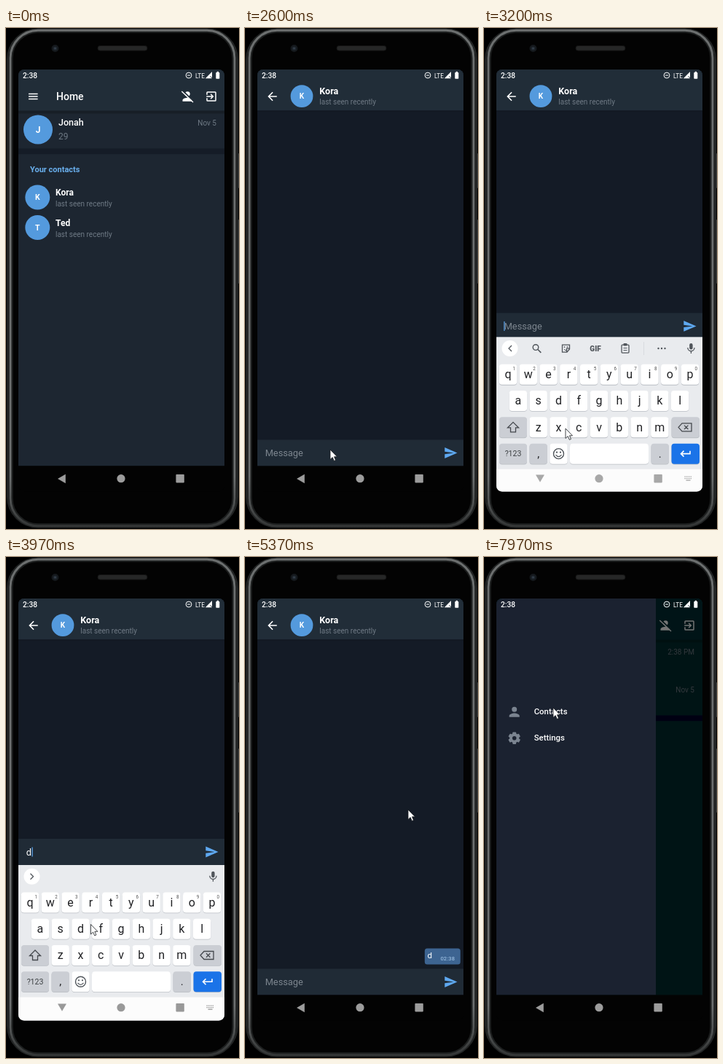
Animation of 320 by 688 pixels, one loop 8000 ms. Source, as an HTML page:

```html
<!DOCTYPE html>
<html lang="en">
<head>
<meta charset="utf-8">
<title>Chat app demo</title>
<style>
html, body { margin: 0; width: 100%; height: 100%; overflow: hidden; background: #000; }
svg { display: block; width: 100%; height: 100%; font-family: Roboto, "Noto Sans", sans-serif; }
</style>
</head>
<body>
<svg id="stage" viewBox="0 0 320 688"></svg>
<script>
const LOOP = 8000;
const BAR = '#212d38', LIST = '#1d2631', GAP = '#151c27', CHAT = '#141b26', BODY = '#030303';
const BLUE = '#549add', MUTED = '#6f7a85';
const FRIENDS = ['Jonah', 'Kora', 'Ted'];

// Markup helpers
const rect = (x, y, w, h, fill, r = 0, extra = '') =>
  `<rect x="${x}" y="${y}" width="${w}" height="${h}" rx="${r}" fill="${fill}" ${extra}/>`;
const dot = (x, y, r, fill, extra = '') => `<circle cx="${x}" cy="${y}" r="${r}" fill="${fill}" ${extra}/>`;
const text = (s, x, y, size, fill, weight = 400, anchor = 'start') =>
  `<text x="${x}" y="${y}" font-size="${size}" font-weight="${weight}" fill="${fill}" text-anchor="${anchor}">${s}</text>`;
const line = (d, color, w = 1.3, extra = '') => `<path d="${d}" fill="none" stroke="${color}" stroke-width="${w}" ${extra}/>`;
const icon = (d, x, y, k, fill) =>
  `<path transform="translate(${x} ${y}) scale(${k}) translate(-12 -12)" d="${d}" fill="${fill}"/>`;
const group = (id, body, extra = '') => `<g id="${id}" ${extra}>${body}</g>`;

const ICON = {
  menu: 'M3 18h18v-2H3v2zm0-5h18v-2H3v2zm0-7v2h18V6H3z',
  back: 'M20 11H7.83l5.59-5.59L12 4l-8 8 8 8 1.41-1.41L7.83 13H20v-2z',
  send: 'M2 21L23 12 2 3V10l15 2-15 2z',
  person: 'M12 12a4 4 0 1 0 0-8a4 4 0 0 0 0 8zm0 2c-2.67 0-8 1.34-8 4v2h16v-2c0-2.66-5.33-4-8-4z',
  exit: 'M10.1 15.6L11.5 17l5-5-5-5-1.4 1.4L12.7 11H3v2h9.7zM19 3H5a2 2 0 0 0-2 2v4h2V5h14v14H5v-4H3v4a2 2 0 0 0 2 2h14a2 2 0 0 0 2-2V5a2 2 0 0 0-2-2z'
};

function avatar(name, x, y, r, size) {
  return dot(x, y, r, BLUE) + text(name[0], x, y + size * .36, size, '#fff', 700, 'middle');
}

function chatRow(name, last, when, y) {
  return avatar(name, 44, y, 20, 12) + text(name, 72, y - 5.5, 12.5, '#fff', 500) +
    text(last, 72, y + 13.3, 12, MUTED) + text(when, 289, y - 5.5, 10, MUTED, 400, 'end');
}

function contactRow(name, y) {
  return avatar(name, 43.3, y, 17, 10.5) + text(name, 68, y - 2.5, 12, '#fff', 700) +
    text('last seen recently', 68, y + 12.5, 10, MUTED);
}

function phone() {
  const rim = (inset, y, color, w) =>
    rect(inset, y, 320 - 2 * inset, 687 - 2 * y, 'none', 44 - inset, `stroke="${color}" stroke-width="${w}"`);
  return rect(0, 0, 320, 688, '#000') +
    rect(318, 172, 2, 48, '#3a3d3d', 1) + rect(318, 263, 2, 88, '#3a3d3d', 1) +
    rect(1, 1.5, 318, 685, BODY, 43) +
    rim(2.5, 2, '#222424', 3) + rim(8.5, 5.5, '#1d1f1f', 2.4) + rim(6, 3.2, 'url(#metal)', 3) +
    dot(67.5, 28, 5, '#15191d') + dot(67.5, 28, 2.6, '#222a32') + dot(67.5, 28, 1.1, '#3a4652') +
    rect(126, 24.5, 68, 6.5, '#262727', 3.2, 'stroke="#161616"');
}

function home() {
  return rect(17, 57, 283, 545, LIST, 0, 'id="list"') +
    rect(17, 57, 283, 56.5, BAR, 0, 'id="bar"') +
    rect(17, 113.5, 283, 4, '#000', 0, 'opacity=".22"') +
    rect(17, 165.5, 283, 7.7, GAP, 0, 'id="gap"') +
    icon(ICON.menu, 37.3, 94, .7, '#fff') + text('Home', 69, 99, 14, '#fff', 500) +
    icon(ICON.person, 249.3, 94, .85, '#fff') +
    line('M242.5 86L258.5 101.5', BAR, 1.8, 'id="notch"') + line('M241.3 87L257 102', '#fff', 1.4) +
    icon(ICON.exit, 282, 94, .75, '#fff') +
    group('newChat', chatRow(FRIENDS[1], 'd', '2:38 PM', 139.5)) +
    group('lower', chatRow(FRIENDS[0], '29', 'Nov 5', 139.5) +
      text('Your contacts', 33, 198.3, 11, '#6ab0ee', 700)) +
    group('oldContacts', contactRow(FRIENDS[1], 232.5) + contactRow(FRIENDS[2], 274)) +
    group('newContacts', contactRow(FRIENDS[2], 284.3));
}

function chat() {
  return rect(17, 57, 283, 580, CHAT) + rect(17, 57, 283, 56.5, BAR) +
    rect(17, 113.5, 283, 1, '#10161f') +
    icon(ICON.back, 37.5, 94, .78, '#fff') + avatar(FRIENDS[1], 78, 93.7, 15.4, 10) +
    text(FRIENDS[1], 102.3, 91, 12.5, '#fff', 700) + text('last seen recently', 102.3, 105, 10, MUTED) +
    group('composer',
      group('bubble', rect(246.8, -28, 49, 22, '#3d6491', 3.5) + text('d', 250.5, -15, 11.5, '#fff') +
        text('02:38', 288, -12, 7.7, '#94b8dc', 500, 'end')) +
      rect(17, 0, 283, 36, '#202b36') +
      group('hint', text('Message', 27.7, 22.6, 12.8, '#7d868f')) +
      group('draft', text('d', 27.7, 22.6, 12.8, '#fff')) +
      rect(27.3, 11.5, 1.2, 13, '#5ea8f0', 0, 'id="caret"') +
      icon(ICON.send, 282.5, 18, .82, '#5ea8f0'));
}

const INK = '#202124', GREY = '#cbced4';
const key = (x, y, w, fill) => rect(x, y - 13.2, w, 28, '#b9bdc3', 4) + rect(x, y - 14, w, 28, fill, 4);

function letters(row, x0, y, numbers) {
  return [...row].map((c, i) => {
    const x = x0 + i * 27.78;
    return key(x - 12.2, y, 24.4, '#fff') + text(c, x, y + 5.2, 16, INK, 400, 'middle') +
      (numbers ? text((i + 1) % 10, x + 8.3, y - 6, 6.3, '#555', 400, 'middle') : '');
  }).join('');
}

function toolbar() {
  const y = 438.7, c = '#50555b';
  const mic = rect(282.2, y - 7, 4.4, 8.5, c, 2.2) + line(`M279.8 ${y - 1}a4.6 4.6 0 0 0 9.2 0M284.4 ${y + 4}v3`, c);
  const tools = line(`M38 ${y - 4}l-4 4l4 4`, c) +
    dot(71, y - 1.5, 3.8, 'none', `stroke="${c}" stroke-width="1.4"`) + line(`M74 ${y + 1.5}l4.3 4.3`, c, 1.6) +
    line(`M117.5 ${y}v-5h-10v10h6.5l3.5-4v-1h-4v5`, c) +
    line(`M110 ${y + 1}q2 3 4 1`, c, 1) + dot(110.5, y - 2, .9, c) + dot(114.5, y - 2, .9, c) +
    text('GIF', 153, y + 3.6, 10, c, 900, 'middle') +
    rect(189, y - 5, 10, 11, 'none', 1, `stroke="${c}" stroke-width="1.3"`) + rect(191.5, y - 7, 5, 3.5, c, 1) +
    line(`M191.5 ${y - .5}h5M191.5 ${y + 2.5}h5`, c, 1) +
    [239.5, 244, 248.5].map(x => dot(x, y, 1.2, c)).join('') + rect(219, y - 9, .8, 18, '#d4d7db');
  return dot(35.5, y, 11, '#fff') + mic + group('tools', tools) +
    group('fold', line(`M33.5 ${y - 4}l4 4l-4 4`, c));
}

function keyboard() {
  const [y1, y2, y3, y4] = [474.5, 510.7, 547, 583.3];
  return rect(17, 423, 283, 230, '#e9ebee') + rect(17, 604.5, 283, 60, '#fcfcfc') + toolbar() +
    letters('qwertyuiop', 33, y1, true) + letters('asdfghjkl', 46.9, y2) + letters('zxcvbnm', 74.7, y3) +
    key(21, y3, 38, GREY) + line(`M40 ${y3 - 7}l7.5 7.5h-4v6h-7v-6h-4z`, '#44484d') +
    key(257.5, y3, 38.5, GREY) +
    line(`M267 ${y3}l5-5.5h13v11h-13zM275 ${y3 - 2.7}l5.4 5.4M280.4 ${y3 - 2.7}l-5.4 5.4`, '#44484d') +
    key(21, y4, 38, GREY) + text('?123', 40, y4 + 3.7, 10.5, '#3c4043', 400, 'middle') +
    key(62.5, y4, 24.4, GREY) + text(',', 74.7, y4 + 5, 15, INK, 400, 'middle') +
    key(90.3, y4, 24.4, '#fff') + dot(102.5, y4, 7, 'none', 'stroke="#50555b" stroke-width="1.4"') +
    dot(100, y4 - 2, 1.1, '#50555b') + dot(105, y4 - 2, 1.1, '#50555b') + line(`M98.5 ${y4 + 1.5}q4 5 8 0`, '#50555b') +
    key(118, y4, 108, '#fff') + key(229.5, y4, 24.4, GREY) + text('.', 241.7, y4 + 5, 15, INK, 400, 'middle') +
    key(257.5, y4, 38.5, '#1a73e8') + line(`M283 ${y4 - 4}v4h-12.5M274.5 ${y4 - 4}l-4 4l4 4`, '#fff', 1.6) +
    group('popup', rect(87, 455, 31, 36, '#c5c8cd', 5) + rect(87, 454, 31, 36, '#fff', 5) +
      text('d', 102.5, 479, 20, INK, 400, 'middle'));
}

function navIcons(back, fill) {
  return `<path d="${back}" fill="${fill}"/>` + dot(158, 618.7, 5.6, fill) + rect(233.4, 613, 11.4, 11.4, fill, .8);
}

function drawer() {
  const c = '#7b8490', teeth = [0, 1, 2, 3, 4, 5]
    .map(i => rect(-2.4, -8.3, 4.8, 5, c, .8, `transform="rotate(${i * 60})"`)).join('');
  return rect(17, 57, 219, 545, '#1b2230') + icon(ICON.person, 41.7, 212.7, .88, c) +
    `<g transform="translate(41.7 248.7)">${teeth}${dot(0, 0, 4.7, 'none', `stroke="${c}" stroke-width="3.8"`)}</g>` +
    text('Contacts', 68.7, 216.3, 11.4, '#fff', 500) + text('Settings', 68.7, 252.3, 11.4, '#fff', 500);
}

function status() {
  return text('2:38', 23, 69, 10.2, '#fff', 500) +
    dot(251, 65, 3.9, 'none', 'stroke="#fff" stroke-width="1"') + line('M249 65h4', '#fff', 1.2) +
    text('LTE', 260, 68.5, 8.3, '#fff') +
    '<path d="M283 60v9.2h-9.2z" fill="#fff"/>' + line('M280.5 66l2.5 3', '#38434d', 1) +
    rect(288.3, 61, 5, 8.7, '#fff', .8) + rect(289.6, 59.8, 2.4, 2, '#fff');
}

function minis() {
  return [0, 1, 2, 3, 4].map(i => rect(275.3 + i * 2.1, 615.5, 1.3, 1.3, '#999') +
    rect(275.3 + i * 2.1, 618, 1.3, 1.3, '#999')).join('') + rect(277.5, 620.5, 6, 1.3, '#999');
}

document.getElementById('stage').innerHTML =
  `<defs><linearGradient id="metal" x1="0" y1="0" x2="0" y2="1">
     <stop offset="0" stop-color="#6c6f6f"/><stop offset=".9" stop-color="#6c6f6f"/><stop offset="1" stop-color="#343636"/>
   </linearGradient>
   <clipPath id="screen">${rect(17, 57, 283, 579.5, '#fff', 8)}</clipPath>
   <clipPath id="pages">${rect(17, 56.5, 283, 545, '#fff')}</clipPath>
   <clipPath id="row">${rect(17, 211.5, 283, 42, '#fff')}</clipPath></defs>` + phone() +
  group('view', group('layers', group('home', home()) +
      group('rowTap', dot(0, 0, 1, '#fff', 'id="rowInk"'), 'clip-path="url(#row)"') +
      group('chat', chat()) + dot(0, 0, 1, '#fff', 'id="ink"') +
      rect(17, 57, 283, 545, '#000', 0, 'id="scrim"') + group('drawer', drawer()) + status(),
      'clip-path="url(#pages)"') +
    rect(17, 601.5, 283, 36, BODY) + navIcons('M71 619l10.8-6.2v12.4z', '#9c9c9c') +
    group('keyboard', keyboard()) +
    group('kbNav', navIcons('M71 613.5h12l-6 10.3z', '#999') + minis()),
    'clip-path="url(#screen)"') +
  '<path id="cursor" d="M0 0V13.5L3.2 10.6L5.3 15.4L7.5 14.5L5.5 9.8H9.5Z" fill="#fff" stroke="#15181c" stroke-width=".8"/>';

const el = {};
document.querySelectorAll('#stage [id]').forEach(n => el[n.id] = n);

// Motion helpers
const clamp = v => Math.max(0, Math.min(1, v));
const span = (t, a, b) => clamp((t - a) / (b - a));
const smooth = p => p * p * (3 - 2 * p);
const easeOut = p => 1 - (1 - p) ** 3;
const easeInOut = p => p < .5 ? 2 * p * p : 1 - 2 * (1 - p) ** 2;
const lerp = (a, b, p) => a + (b - a) * p;
const show = (id, on) => el[id].setAttribute('display', on ? 'inline' : 'none');
const fade = (id, v) => el[id].setAttribute('opacity', v);
const move = (id, x, y) => el[id].setAttribute('transform', `translate(${x} ${y})`);

function mix(a, b, p) {
  const part = (s, i) => parseInt(s.slice(i, i + 2), 16);
  return `rgb(${[1, 3, 5].map(i => Math.round(lerp(part(a, i), part(b, i), p)))})`;
}

// Pointer stops: time, x, y
const POINTER = [
  [30, 274, 88], [400, 28, 180], [830, 196, 230], [2070, 196, 230], [2600, 117, 579],
  [2870, 117, 579], [3200, 112, 550], [3600, 103, 512], [3900, 103, 512], [4330, 287, 409],
  [4960, 287, 409], [5370, 224, 347], [5400, 224, 347], [5970, 38, 95], [6500, 38, 95],
  [6700, 41, 99], [7450, 41, 99], [7800, 262, 179], [7970, 95, 207]
];

function pointer(t) {
  const i = POINTER.findIndex(p => p[0] > t);
  if (i < 0) return POINTER[POINTER.length - 1].slice(1);
  if (i === 0) return POINTER[0].slice(1);
  const [t0, x0, y0] = POINTER[i - 1], [t1, x1, y1] = POINTER[i];
  const p = smooth(span(t, t0, t1));
  return [lerp(x0, x1, p), lerp(y0, y1, p)];
}

function ripple(id, t, start, length, x, y, size) {
  const p = span(t, start, start + length), n = el[id];
  n.setAttribute('cx', x);
  n.setAttribute('cy', y);
  n.setAttribute('r', size * easeOut(clamp(p * 1.6)));
  fade(id, p > 0 && p < 1 ? .1 * Math.min(1, p * 8, (1 - p) * 2.5) : 0);
}

function draw(t) {
  const replied = t >= 4600;

  // Home list
  const shift = replied ? 52 : 0;
  show('newChat', replied);
  show('newContacts', replied);
  show('oldContacts', !replied);
  move('lower', 0, shift);
  el.gap.setAttribute('y', 165.5 + shift);
  ripple('rowInk', t, 900, 700, 196, 230, 200);

  // Page transitions rise and fade in, then drop and fade out
  const enter = easeOut(span(t, 1350, 1880)), leave = easeInOut(span(t, 6280, 6690));
  const page = enter * (1 - leave);
  show('chat', page > 0);
  fade('chat', page);
  move('chat', 0, 136 * (1 - page));

  // Keyboard and composer
  const up = easeOut(span(t, 2940, 3260)), down = easeInOut(span(t, 4770, 5004));
  const kb = t < 4000 ? 1 - up : down;
  show('keyboard', kb < 1);
  move('keyboard', 0, 214 * kb);
  fade('kbNav', clamp(1 - 25 * kb));
  const rise = easeOut(span(t, 2960, 3300));
  const fall = easeInOut(span(t, 4800, 5040));
  move('composer', 0, 387 + 178.5 * (t < 4000 ? 1 - rise : fall));

  // Typing
  const typed = t >= 3790 && !replied, focused = t >= 2930 && t < 4770;
  show('hint', !typed);
  show('draft', typed);
  show('bubble', replied);
  show('caret', focused && (t - 2930) % 1000 < 500);
  el.caret.setAttribute('x', typed ? 35.5 : 27.3);
  show('popup', t >= 3750 && t < 3860);
  show('tools', t < 3800);
  show('fold', t >= 3800);

  if (t < 5500) ripple('ink', t, 4570, 500, 282.5, 405, 25);
  else if (t < 6900) ripple('ink', t, 6130, 450, 37.5, 94, 25);
  else ripple('ink', t, 7000, 450, 37.5, 94, 25);

  // Drawer
  const open = easeOut(span(t, 7120, 7480));
  const barColor = mix(BAR, '#002c32', open);
  show('drawer', open > 0);
  move('drawer', -219 * (1 - open), 0);
  fade('scrim', .54 * open);
  el.list.setAttribute('fill', mix(LIST, '#002c2e', open));
  el.bar.setAttribute('fill', barColor);
  el.notch.setAttribute('stroke', barColor);
  el.gap.setAttribute('fill', mix(GAP, '#000028', open));

  show('cursor', t >= 30);
  move('cursor', ...pointer(t));
}

function tick() {
  draw(performance.now() % LOOP);
  requestAnimationFrame(tick);
}
tick();
</script>
</body>
</html>
```
